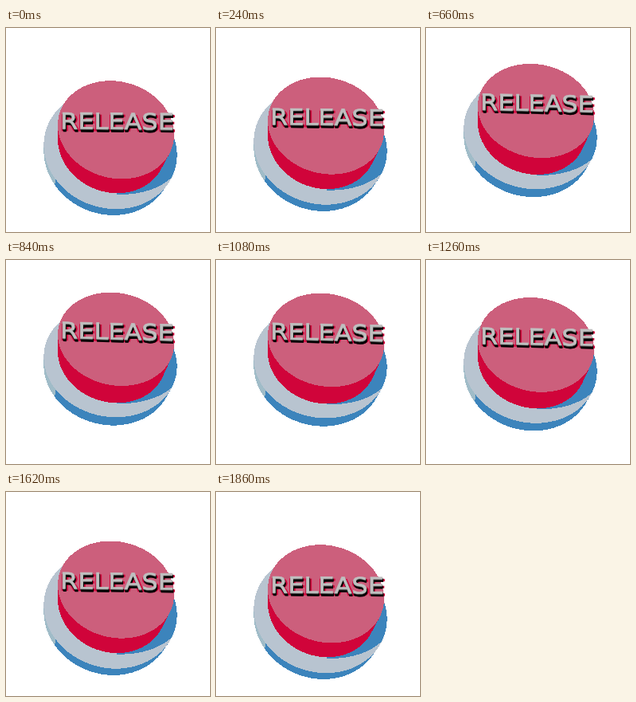
An HTML page that plays this animation: 256 px wide and 256 px high, repeating every 1920 ms.

```html
<!DOCTYPE html>
<html lang="en">
<head>
<meta charset="utf-8">
<title>Release button</title>
<style>
  html, body { margin: 0; width: 100%; height: 100%; overflow: hidden; background: #fff; }
  svg { display: block; width: 100vw; height: 100vh; }
  text { font: 32px "DejaVu Sans", sans-serif; stroke-width: .7; }
</style>
</head>
<body>
<svg viewBox="0 0 256 256" shape-rendering="crispEdges">
  <defs>
    <linearGradient id="rim" gradientUnits="userSpaceOnUse" x1="-1" y1="0" x2="1" y2="0">
      <stop stop-color="#a0bcc8" offset=".087"/>
      <stop stop-color="#3c84bc" offset=".087"/>
    </linearGradient>
  </defs>
  <g id="base" fill="url(#rim)"></g>
  <g id="face">
    <circle r="1" fill="#b8c4d0"/>
    <path fill="#3c84bc" d="M.1 .75Q.63 .71 .92 .39A1 1 0 0 0 0 -1Z"/>
  </g>
  <g id="cap" fill="#d0043a"></g>
  <g id="top"><circle r="1" fill="#cc5f7c"/></g>
  <g id="label"></g>
</svg>
<script>
const LOOP = 1920, STEP = 60, SLICES = 16;
const $ = s => document.querySelector(s);

function add(parent, tag, attrs) {
  const el = document.createElementNS('http://www.w3.org/2000/svg', tag);
  for (const k in attrs) el.setAttribute(k, attrs[k]);
  parent.append(el);
  return el;
}

// Each wall is a stack of discs, from its foot up to its rim.
for (const id of ['#base', '#cap'])
  for (let i = 0; i <= SLICES; i++) add($(id), 'circle', { r: 1 });

// Letters are stacked from the deepest layer up to the face.
const layers = [[-1, 3, '#d0043a'], [3, 3, '#d0043a'], [1, 4, '#000'], [1, 3, '#000'],
  [0.5, 2, '#000'], [0, 1, '#555'], [0, 0, '#c0c0c0']];
layers.forEach(([x, y, color], i) => {
  const t = add($('#label'), 'text', { x, y, fill: color, stroke: color });
  t.textContent = 'RELEASE';
  if (i < layers.length - 1) t.setAttribute('aria-hidden', 'true');
});

// Maps a unit disc to an ellipse whose axis leans to the right.
function place(el, cx, cy, rx, ry, lean) {
  const d = ry * Math.sqrt(1 - lean * lean);
  el.setAttribute('transform', `matrix(${rx} ${lean * ry} 0 ${d} ${cx} ${cy})`);
}

// A drum narrows downwards by taper and drifts left by the same amount.
function drum(wall, lid, cx, cy, rx, ry, depth, taper, lean) {
  [...$(wall).children].forEach((el, i) => {
    const k = 1 - i / SLICES;
    place(el, cx - taper * k, cy + depth * k, rx - taper * k, ry, lean);
  });
  place($(lid), cx, cy, rx, ry, lean);
}

function draw(time) {
  const step = Math.floor((time % LOOP) / STEP);
  const c = Math.cos((step + 0.5) * STEP / LOOP * 2 * Math.PI);

  drum('#base', '#face', 131, 140 + 13 * c, 83.7, 72 + 2.3 * c, 9 - 1.3 * c, 3, 0.085);
  drum('#cap', '#top', 138, 113.3 + 14.6 * c, 73, 60.1 + 1.5 * c, 19.7 - 1.8 * c, 5, 0.1);
  $('#label').setAttribute('transform',
    `matrix(1 ${(2 - c) / 138} 0 .88 68 ${112 + 14.5 * c})`);
}

const start = performance.now();
function tick() {
  draw(performance.now() - start);
  requestAnimationFrame(tick);
}
tick();
</script>
</body>
</html>
```
